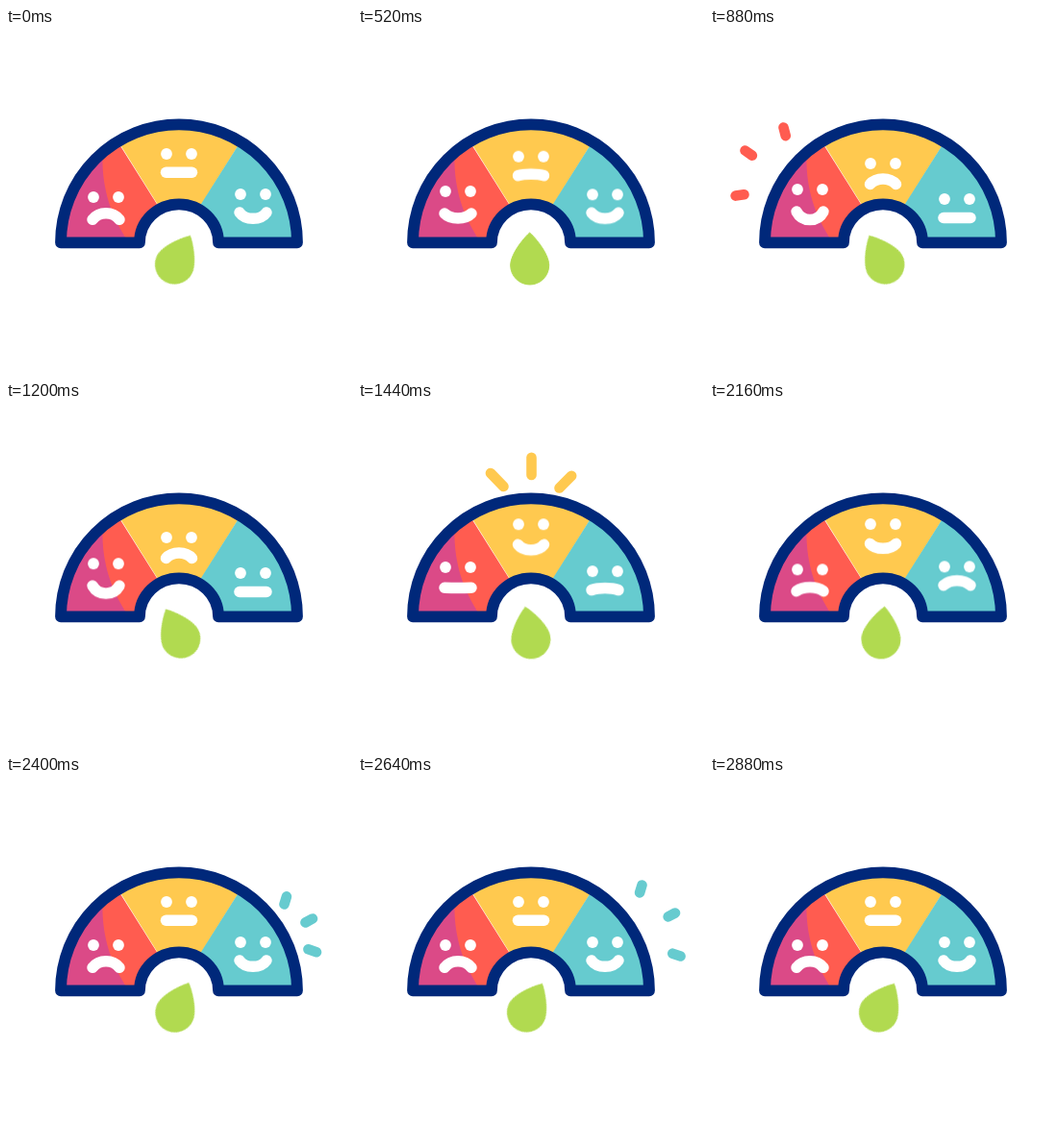
Write an HTML page that moves like this. It is 360 px wide and 360 px high and loops after 3000 ms.

```html
<!DOCTYPE html>
<html lang="en">
<head>
<meta charset="utf-8">
<title>Mood gauge</title>
<style>
  html, body { margin: 0; width: 100%; height: 100%; overflow: hidden; background: #fff; }
  svg { display: block; width: 100vw; height: 100vh; }

  .coral { --c: #ff5c50; }
  .yellow { --c: #ffc94f; }
  .teal { --c: #66cbcf; }
  .fill { fill: var(--c); }

  /* Each face has three moods: mouth shape m1-m3 and height y1-y3 */
  .left {
    --m1: path("M-14 23.3C-7 14.5 7 14.5 14 23.3"); --y1: 176px;
    --m2: path("M-14 23C-8 34.4 8 34.4 14 23"); --y2: 168px;
    --m3: path("M-14 21.3C-7 21.3 7 21.3 14 21.3"); --y3: 172px;
  }
  .mid {
    --m1: path("M-13.5 19.2C-7 19.2 7 19.2 13.5 19.2"); --y1: 131px;
    --m2: path("M-13.5 21.5C-7 14 7 14 13.5 21.5"); --y2: 141px;
    --m3: path("M-13.5 21C-8 31 8 31 13.5 21"); --y3: 125px;
  }
  .right {
    --m1: path("M-14 19C-8 27.4 8 27.4 14 19"); --y1: 173px;
    --m2: path("M-14 19.5C-7 19.5 7 19.5 14 19.5"); --y2: 178px;
    --m3: path("M-14 19.5C-7 9.5 7 9.5 14 19.5"); --y3: 171px;
  }
  .face > * { animation: 3s ease-in-out infinite; fill: #fff; }
  .face path { fill: none; stroke: #fff; stroke-width: 11.5; stroke-linecap: round; }
  .left > * { animation-name: left; }
  .mid > * { animation-name: mid; }
  .right > * { animation-name: right; }

  @keyframes left {
    0%, 10.33%, 76.83%, 100% { d: var(--m1); transform: translate(0, var(--y1)); }
    21%, 38.33% { d: var(--m2); transform: translate(0, var(--y2)); }
    49%, 66.17% { d: var(--m3); transform: translate(0, var(--y3)); }
  }
  @keyframes mid {
    0%, 13.5%, 78.33%, 100% { d: var(--m1); transform: translate(0, var(--y1)); }
    24.17%, 40.17% { d: var(--m2); transform: translate(0, var(--y2)); }
    50.83%, 67.67% { d: var(--m3); transform: translate(0, var(--y3)); }
  }
  @keyframes right {
    0%, 15.5%, 79.53%, 100% { d: var(--m1); transform: translate(0, var(--y1)); }
    26.17%, 44.27% { d: var(--m2); transform: translate(0, var(--y2)); }
    54.93%, 68.87% { d: var(--m3); transform: translate(0, var(--y3)); }
  }

  .drop {
    fill: #b1da50; stroke: #b1da50; stroke-linejoin: round;
    transform-origin: 178.7px 240px;
    animation: swing 3s ease-in-out infinite;
  }
  @keyframes swing {
    0%, 8%, 84.67%, 100% { transform: rotate(28.5deg); }
    26.67%, 37% { transform: rotate(-28.5deg); }
    55.67%, 66% { transform: rotate(0deg); }
  }

  /* Rays run outwards: drawn on from the inner end, then wiped the same way */
  .rays path {
    stroke: var(--c); stroke-width: 10.6; stroke-linecap: round;
    stroke-dasharray: 1 3;
    animation: ray 3s linear var(--at) infinite both;
  }
  @keyframes ray {
    0% { stroke-dashoffset: 1; opacity: 0; }
    0.01% { opacity: 1; }
    6.67% { stroke-dashoffset: 0; }
    13.32% { opacity: 1; }
    13.33%, 100% { stroke-dashoffset: -1; opacity: 0; }
  }
</style>
</head>
<body>
<svg viewBox="0 0 360 360">
  <defs>
    <clipPath id="dome">
      <path d="M57 223.3A123 123 0 0 1 303 223.3H221A41 40 0 0 0 139 223.3Z"/>
    </clipPath>
    <g id="eyes"><circle cx="-13" r="5.9"/><circle cx="13" r="5.9"/></g>
  </defs>

  <g class="rays coral" style="--at: 570ms">
    <path pathLength="1" d="M46.5 171.8L26.6 174.6"/>
    <path pathLength="1" d="M53 139L36.5 127.5"/>
    <path pathLength="1" d="M81.5 122.9L76.5 103.5"/>
  </g>
  <g class="rays yellow" style="--at: 1260ms">
    <path pathLength="1" d="M151.5 88L136.5 72.5"/>
    <path pathLength="1" d="M180.5 76L180.5 55.8"/>
    <path pathLength="1" d="M209.5 89.5L223.5 75.5"/>
  </g>
  <g class="rays teal" style="--at: 2320ms">
    <path pathLength="1" d="M289.5 133.5L295.5 113.5"/>
    <path pathLength="1" d="M311.5 152.5L330 142.5"/>
    <path pathLength="1" d="M314.5 180.3L335.6 187.5"/>
  </g>

  <g clip-path="url(#dome)">
    <path class="coral fill" d="M182 223L111 110L40 110V230H182Z"/>
    <path fill="#db4a87" d="M101 120C98 160 106 190 127 222H40V120Z"/>
    <path class="yellow fill" d="M180.5 220L105.5 100V90H255.5V100Z"/>
    <path class="teal fill" d="M179 221L255.5 100H320V230H179Z"/>
  </g>
  <path d="M57 223.3A123 123 0 0 1 303 223.3H221A41 40 0 0 0 139 223.3Z"
        fill="none" stroke="#00287a" stroke-width="11.8" stroke-linejoin="round"/>

  <g class="face left" transform="translate(104 0)"><use href="#eyes"/><path/></g>
  <g class="face mid" transform="translate(180 0)"><use href="#eyes"/><path/></g>
  <g class="face right" transform="translate(257 0)"><use href="#eyes"/><path/></g>

  <path class="drop" d="M178.7 213C182.5 216 198.7 234 198.7 247A20 20 0 0 1 158.7 247C158.7 234 174.9 216 178.7 213Z"/>
</svg>
</body>
</html>
```
